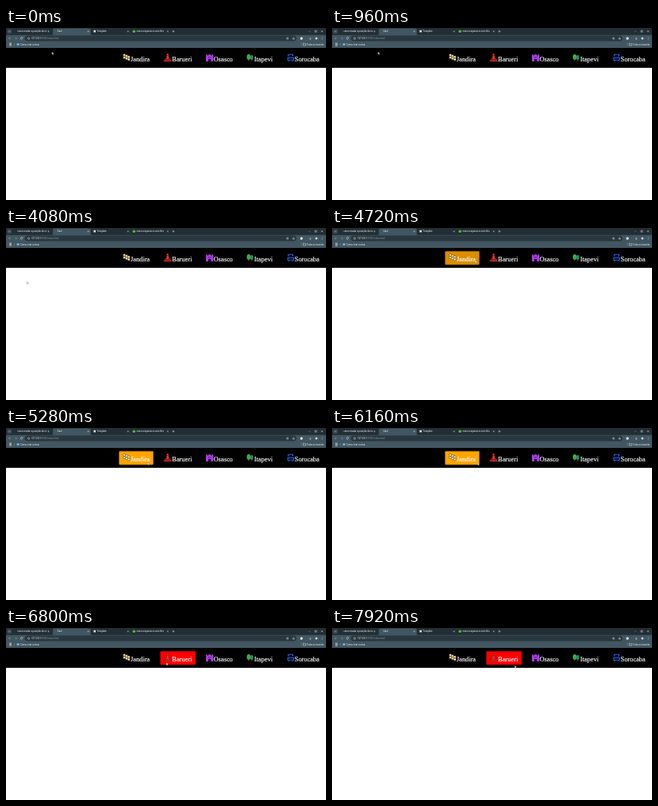
Animation of 400x216 px, one loop 8 s. Source, as an HTML page:

```html
<!DOCTYPE html>
<html lang="pt">
<head>
<meta charset="utf-8">
<title>Menu</title>
<style>
html, body { margin: 0; width: 100%; height: 100%; overflow: hidden; background: #fff; }
svg { display: block; width: 100vw; height: 100vh; }
.ui { font: 2.9px Roboto, "Open Sans", sans-serif; fill: #f4f7f8; }
.link { font: 8.3px "Liberation Serif", "Noto Serif", serif; fill: #fff; stroke: #fff; stroke-width: .15; }
.line { fill: none; stroke: #e2e8ea; stroke-width: .5; }
.dim { opacity: .45; }
</style>
</head>
<body>
<svg viewBox="0 0 400 216">
  <rect width="400" height="216" fill="#fff"/>

  <!-- tab strip -->
  <rect width="400" height="9" fill="#222e34"/>
  <rect x="1.5" y="1.5" width="5.5" height="5.5" rx="1.6" fill="#3a4b54"/>
  <path class="line" d="M3.3 3.8l1 1 1-1"/>
  <path d="M57 9q1.5 0 1.5-1.5v-5q0-2 2-2h43.500q2 0 2 2v5q0 1.500 1.500 1.500z" fill="#415660"/>
  <g id="tabs" class="ui"></g>
  <rect x="109.500" y="2.800" width="2.600" height="2.600" fill="#e8eced"/>
  <circle cx="160" cy="4.200" r="1.700" fill="#55c235"/>
  <path class="line" d="M207.800 4.200h2.800M209.200 2.800v2.800M386.200 3.200h2v2h-2zM394 3.200l2 2m0-2l-2 2"/>
  <path class="line dim" d="M378.200 4.200h2.400"/>

  <!-- toolbar -->
  <rect y="8.800" width="400" height="16.200" fill="#415660"/>
  <rect x="23.500" y="9.600" width="339.500" height="7" rx="3.500" fill="#29373e"/>
  <path class="line dim" d="M6 13H3.400l1.200-1.200M3.400 13l1.200 1.200M11 13h2.600l-1.200-1.200M13.600 13l-1.200 1.200"/>
  <path class="line" d="M20.600 12.200a1.300 1.300 0 1 0 .1 1.300M20.800 11.300v1.100h-1.100"/>
  <circle class="line" cx="28.300" cy="13.100" r="1.200"/>
  <g class="ui">
    <text x="32" y="14.100">127.0.0.1<tspan fill="#84949b">:5500/index.html</tspan></text>
    <text x="18" y="21.500">Como criar a nova</text>
    <text x="376" y="21.500" font-size="2.600">Todos os favoritos</text>
  </g>
  <path class="line" d="M351 12.200h1.800v1.800H351zM359.500 11.800l1.200 2.200h-2.400z"/>
  <circle cx="369.300" cy="13.100" r="1.600" fill="#f4f7f8"/>
  <path class="line" d="M380.300 11.500v2.800M379.200 13.200l1.100 1.100 1.100-1.100"/>
  <circle cx="388" cy="13.100" r="1.400" fill="#dce3e6"/>
  <path class="line" d="M395.300 11.600v3" stroke-dasharray=".7 .4"/>
  <path d="M4 19.100h3M4 20.600h3M4 22.100h3" stroke="#f4f7f8" stroke-width=".8" stroke-dasharray=".8 .3"/>
  <path class="line dim" d="M10.300 18.700v3.600M369 18.700v3.600"/>
  <circle cx="15" cy="20.500" r="1.600" fill="#6cbcf0"/>
  <path class="line" d="M371.500 19.200h1.400l.4.500h1.500V22h-3.300z"/>

  <!-- menu -->
  <rect y="25" width="400" height="25" fill="#000"/>
  <rect id="jandira" x="141.500" y="29.300" width="42.500" height="16.700" rx="1" fill="#ffa500" stroke="#b87700" stroke-width=".7"/>
  <rect id="barueri" x="193" y="29.300" width="44" height="16.700" rx="1" fill="#f00" stroke="#a00" stroke-width=".7"/>
  <g id="flowers" fill="#fbe3a8" stroke="#2b1d08" stroke-width=".4"></g>
  <g fill="#e2352f" stroke="#4a0c0a" stroke-width=".35">
    <path d="M197.300 42v-1.800h9.600V42z"/>
    <path d="M198.600 39.800v-1.400h1.600l.5-3.800h2.600l.6 3.800h2v1.400z"/>
    <circle cx="202" cy="33.400" r="1.300"/>
  </g>
  <path d="M250 42v-8.700h1.600v1.300h1.500v-1.300h2.800v1.300h1.500v-1.300h1.600V42h-2.800v-2.400q-1.700-1.800-3.400 0V42z" fill="#b13cf0"/>
  <path d="M252 36.800h5" stroke="#2a0a3c" stroke-width=".6"/>
  <ellipse cx="307.200" cy="36.900" rx="2" ry="3" fill="#1f8a68"/>
  <ellipse cx="303.400" cy="36.500" rx="2.400" ry="3.400" fill="#3fae4c"/>
  <path d="M303.400 36.500v5.300M307.200 37.500v4.300" stroke="#8b6a3b" stroke-width=".6"/>
  <g fill="none" stroke="#2c5fe4" stroke-width="1.100">
    <path d="M353 36.300v-3.100h5.600v3.100M351.400 37.500h8.800M352.200 38v2.200h7.200V38M353 40.300v1.700M358.600 40.300v1.700"/>
  </g>
  <g class="link">
    <text x="155.800" y="41.800">Jandira</text>
    <text x="207.600" y="41.800">Barueri</text>
    <text x="259.500" y="41.800">Osasco</text>
    <text x="310.300" y="41.800">Itapevi</text>
    <text x="360.800" y="41.800">Sorocaba</text>
  </g>
  <path id="cursor" d="M0 0v3.200l.8-.7.600 1.200.5-.2-.6-1.200h1.100z" fill="#fff" stroke="#444" stroke-width=".25"/>
</svg>
<script>
const LOOP = 8000, STEP = 80, FADE = 500;
const get = id => document.getElementById(id);

get('tabs').innerHTML = ['como mudar a posição do m', 'Card', 'Template', 'menu responsivo com flex']
  .map((name, i) => {
    const x = 14.2 + 49.7 * i;
    return `<text x="${x}" y="5.200">${name}</text>
      <path class="line" d="M${x + 38} 3.400l1.800 1.800m0-1.800l-1.800 1.800"/>`;
  }).join('');

// two slanted rows of three
get('flowers').innerHTML = Array.from({ length: 6 }, (_, i) => {
  const col = i % 3, row = Math.floor(i / 3);
  return `<circle cx="${147.900 + 2.800 * col}" cy="${34 + 1.200 * col + 3 * row}" r="1.600"/>`;
}).join('');

// pointer glides; bend bows the way sideways
const start = { x: 57.5, y: 30 };
const moves = [
  { from: 1760, to: 2720, x: 311.8, y: 77.5, bend: 0 },
  { from: 3039, to: 3040, x: 47, y: 116, bend: 0 },
  { from: 3200, to: 4080, x: 26, y: 67, bend: -30 },
  { from: 4080, to: 4720, x: 179, y: 41, bend: 0 },
  { from: 5040, to: 5360, x: 182, y: 43.5, bend: -10 },
  { from: 6160, to: 6480, x: 200.5, y: 43.5, bend: 0 },
  { from: 7520, to: 7920, x: 228.5, y: 47, bend: 0 }
];

const clamp = k => Math.min(1, Math.max(0, k));
const smooth = k => k * k * (3 - 2 * k);

function pointAt(t) {
  let { x, y } = start;
  for (const m of moves) {
    const k = smooth(clamp((t - m.from) / (m.to - m.from)));
    x += (m.x - x) * k + m.bend * Math.sin(Math.PI * k);
    y += (m.y - y) * k;
  }
  return [x, y];
}

// close to the CSS "ease" curve
const ease = k => 1 - (1 - smooth(Math.sqrt(k))) ** 1.1;
const fade = (t, from, length = FADE) => ease(clamp((t - from) / length));

function draw(t) {
  const dip = .45 * (fade(t, 5560, 160) - fade(t, 5700, 220));
  get('jandira').setAttribute('opacity', fade(t, 4445) - dip - fade(t, 6205));
  get('barueri').setAttribute('opacity', fade(t, 6280));
  get('cursor').setAttribute('transform', `translate(${pointAt(t)})`);
}

const begin = performance.now();
function tick() {
  const t = (performance.now() - begin) % LOOP;
  draw(Math.floor(t / STEP) * STEP);
  requestAnimationFrame(tick);
}
tick();
</script>
</body>
</html>
```
